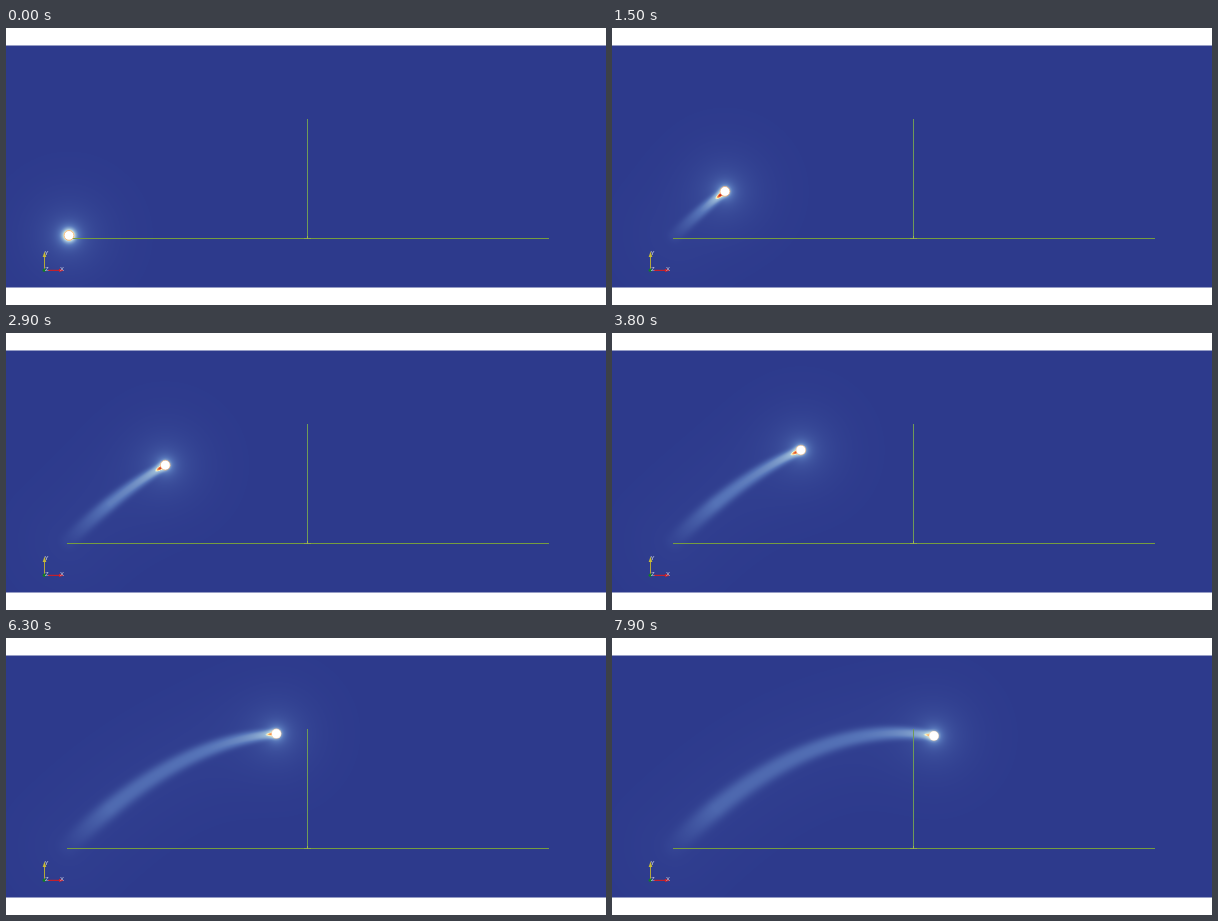
These frames come from a looping animation (600x277 px, 8000 ms). An HTML page with a canvas:

```html
<!DOCTYPE html>
<html lang="en">
<head>
<meta charset="utf-8">
<title>Projectile wake</title>
<style>
html, body { margin: 0; width: 600px; height: 277px; overflow: hidden; background: #fff; }
canvas, svg { position: absolute; left: 0; display: block; }
canvas { top: 17px; }
svg { top: 0; }
text { font: 6px "Liberation Sans", Arial, sans-serif; fill: #d8d8e8; }
</style>
</head>
<body>
<canvas id="field" width="600" height="243"></canvas>
<svg width="600" height="277" viewBox="0 0 600 277">
  <g shape-rendering="crispEdges">
    <path d="M0 17.5H600M0 259.5H600" stroke="#fff" stroke-opacity=".5"/>
    <rect x="301" y="91" width="1" height="119" fill="#6f9a58"/>
    <rect x="61" y="210" width="482" height="1" fill="#769c40"/>
    <rect x="298" y="210" width="7" height="1" fill="#8fae42"/>
    <rect x="301" y="208" width="1" height="3" fill="#9ab458"/>
  </g>
  <g id="axes">
    <path d="M38.5 241V228" stroke="#b5a83a"/>
    <path d="M36.7 229L38.5 223.5L40.3 229Z" fill="#c8bb38"/>
    <path d="M42 242.4H54" stroke="#c3202c" stroke-width="1.2"/>
    <path d="M53 240.7L58 242.4L53 244.1Z" fill="#d02028"/>
    <circle cx="38.3" cy="242.2" r="1.7" fill="#127a2c"/>
    <text x="38.5" y="227">Y</text>
    <text x="54" y="243">X</text>
    <text x="39" y="243">Z</text>
  </g>
  <circle id="ball" r="4.9" fill="#fff" stroke="#f3a45c" stroke-width=".8"/>
</svg>
<script>
const W = 600, H = 243, TOP = 17, LOOP = 8000, STEP = 100, RADIUS = 5;
const ctx = document.getElementById('field').getContext('2d');
const ball = document.getElementById('ball');
const image = ctx.createImageData(W, H);
const pixels = new Uint32Array(image.data.buffer);

// Ballistic path with slight drag, time in seconds
const pathX = t => 63 + 33.45 * t - 0.085 * t * t;
const pathY = t => 207.4 - 32.96 * t + 2.417 * t * t;
const velX = t => 33.45 - 0.17 * t;
const velY = t => -32.96 + 4.834 * t;

const stops = [
  [0, 45, 58, 140], [0.25, 86, 116, 184], [0.5, 168, 200, 222],
  [0.65, 250, 245, 195], [0.8, 250, 155, 85], [1, 200, 45, 38]
];
const SHADES = 1023;
const palette = new Uint32Array(SHADES + 1);
for (let i = 0; i <= SHADES; i++) {
  const v = i / SHADES;
  const n = Math.max(1, stops.findIndex(s => s[0] >= v));
  const a = stops[n - 1], b = stops[n];
  const k = (v - a[0]) / (b[0] - a[0]);
  const [r, g, bl] = [1, 2, 3].map(c => Math.round(a[c] + (b[c] - a[c]) * k));
  palette[i] = (255 << 24 | bl << 16 | g << 8 | r) >>> 0;
}

const clamp = (v, lo, hi) => Math.min(hi, Math.max(lo, v));

// Time at which the path passes closest to a point
function nearest(x, y, now) {
  const dx = (x - 63) / 33.45;
  let u = clamp(dx + 0.00254 * dx * dx, 0, now);
  for (let i = 0; i < 3; i++) {
    const vx = velX(u), vy = velY(u);
    const along = (x - pathX(u)) * vx + (y - pathY(u)) * vy;
    u = clamp(u + along / (vx * vx + vy * vy), 0, now);
  }
  return u;
}

function wake(x, y, now) {
  const u = nearest(x, y, now);
  const d = Math.hypot(x - pathX(u), y - pathY(u));
  const haze = 0.018 * Math.exp(-d * d / 2500);
  if (d > 30) return [haze, 0];
  const age = now - u;
  const width = 3.4 + 2.8 * Math.sqrt(age);
  const fade = Math.min(1, 0.15 + u * 0.7);
  const trail = (0.23 * Math.exp(-age / 25) + 0.18 * Math.exp(-age / 1.1)) * fade
    * Math.exp(-Math.pow(d / width, 2.6));
  const back = Math.max(0, age * Math.hypot(velX(u), velY(u)) - RADIUS);
  const heat = (1.12 - 0.045 * now) * Math.min(1, now * 2);
  const core = heat * Math.exp(-Math.pow(back / 8.5, 2)) * Math.exp(-d * d / 8);
  return [trail + haze, core];
}

function draw(now) {
  const bx = pathX(now), by = pathY(now);
  const glow = 0.23 + 0.25 * Math.exp(-now * 3);
  for (let j = 0, p = 0; j < H; j++) {
    const y = j + TOP + 0.5;
    for (let i = 0; i < W; i++, p++) {
      const x = i + 0.5;
      const r = Math.max(0, Math.hypot(x - bx, y - by) - RADIUS);
      const halo = glow * Math.exp(-r / 3.8) + 0.14 * Math.exp(-r / 17);
      const [trail, core] = wake(x, y, now);
      const v = Math.max(halo + trail * (1 - halo), core);
      pixels[p] = palette[Math.round(clamp(v, 0, 1) * SHADES)];
    }
  }
  ctx.putImageData(image, 0, 0);
  ball.setAttribute('cx', bx);
  ball.setAttribute('cy', by);
  ball.setAttribute('stroke-opacity', 0.9 - 0.08 * now);
}

const start = performance.now();
let shown = -1;
function tick() {
  const step = Math.floor((performance.now() - start) % LOOP / STEP);
  if (step !== shown) {
    shown = step;
    draw(step * STEP / 1000);
  }
  requestAnimationFrame(tick);
}
tick();
</script>
</body>
</html>
```
